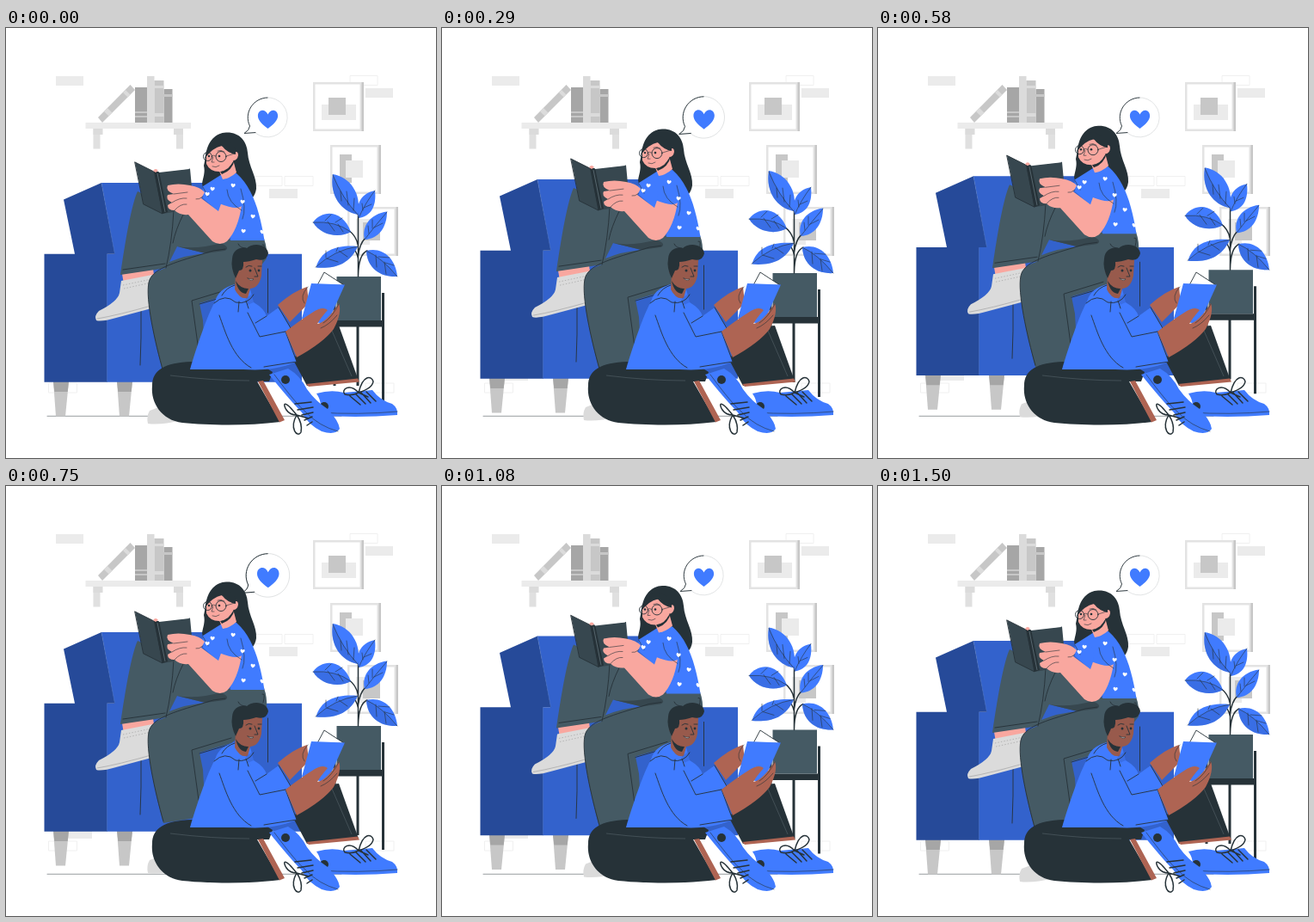
An HTML page for the animation above (1.54 s loop, 500 by 500 pixels).

```html
<!DOCTYPE html>
<html lang="en">
<head>
<meta charset="utf-8">
<title>Reading together</title>
<style>
  html, body { margin: 0; width: 100%; height: 100%; overflow: hidden; background: #fff; }
  svg { display: block; width: 100vw; height: 100vh; }
  .blue { fill: #407bff; } .mid { fill: #3362cc; } .deep { fill: #264a99; }
  .ink { fill: #263238; } .slate { fill: #455a64; } .shade { fill: #37474f; }
  .pale { fill: #ebebeb; } .soft { fill: #dbdbdb; } .grey { fill: #c7c7c7; } .dim { fill: #a6a6a6; }
  .rose { fill: #f9a79f; } .tan { fill: #ae6453; } .brown { fill: #985a4c; } .white { fill: #fff; }
  .line { fill: none; stroke: #263238; stroke-width: .9; stroke-linecap: round; stroke-linejoin: round; }
  .fine { stroke-width: .6; } .bold { stroke-width: 1.5; }
  .seam { fill: none; stroke: #56646b; stroke-width: .6; }
  .stitch { fill: none; stroke: #aaa; stroke-width: .8; }
  .brick { fill: #fff; stroke: #ededed; stroke-width: .8; }
</style>
</head>
<body>
<svg viewBox="0 0 500 500">
  <defs>
    <path id="heart" d="M0,11.5 C-6,7 -12,2 -11.6,-4 C-11,-11 -3,-12 0,-5 C3,-12 11,-11 11.6,-4 C12,2 6,7 0,11.5Z"/>
    <g id="frame">
      <rect class="grey" width="59" height="57"/>
      <rect fill="#e3e3e3" width="56.5" height="57"/>
      <rect class="white" x="2.5" y="2.5" width="52" height="52"/>
    </g>
    <g id="foot">
      <path class="grey" d="M-9,411H9L5,451.500H-6Z"/>
      <path class="dim" d="M-9,411H9L7.700,423H-7.700Z"/>
    </g>
  </defs>

  <!-- wall -->
  <path class="pale" d="M58,56h32v11h-32Z M418,70h32v11h-32Z M306,187h33v11h-33Z M68,400h32v10h-32Z"/>
  <path class="brick" d="M400,55.500h32v11h-32Z M289,172.500h32v11h-32Z M324,172.500h33v11h-33Z M49.500,413h33v11h-33Z M418,413h33v11h-33Z"/>
  <path fill="#e0e0e0" d="M101.500,117h8v23.500h-8Z M198,117h8v23.500h-8Z"/>
  <path class="soft" d="M101.500,117h11v7h-11Z M195,117h11v7h-11Z"/>
  <rect class="pale" x="92.500" y="110" width="122.500" height="7"/>
  <path class="grey" d="M107,104L144.500,66L150,72L112,110Z"/>
  <path class="soft" d="M114,97l4,-4 5.500,5.500 -4,4Z M136,75l3,-3 5.500,5.500 -3,3Z"/>
  <path class="dim" d="M150,69h14v41h-14Z M183.500,71h10v39h-10Z"/>
  <path class="soft" d="M164,56h8.500v54h-8.500Z"/>
  <path class="grey" d="M172.500,61h11v49h-11Z M150,97h14v2h-14Z M150,102h14v2h-14Z M183.500,77h10v3h-10Z"/>
  <path class="soft" d="M172.500,67h11v3h-11Z M172.500,99h11v4h-11Z"/>
  <use href="#frame" x="357" y="63"/>
  <path class="pale" d="M367,89h40v18h-40Z"/><path class="grey" d="M375,81h20v20h-20Z"/>
  <use href="#frame" x="377" y="136"/>
  <path class="grey" d="M388,147h14v33h-14Z"/><path class="pale" d="M395,154h20v20h-20Z"/>
  <use href="#frame" x="397" y="208"/>
  <path class="pale" d="M407,222h16v30h-16Z"/><path class="grey" d="M415,226h20v21h-20Z"/>
  <path class="line fine" d="M48,451.300H390" opacity=".8"/>

  <g id="bubble">
    <path fill="#fff" stroke="#b5babd" stroke-width=".4" d="M290,122L277,122.500Q283,119 283.500,114A23,23 0 1 1 290,122Z"/>
    <path class="line" d="M290,121.500L277,122.500Q283,119 283.500,114A23,23 0 0 1 304,81"/>
    <use href="#heart" class="blue" x="304.500" y="105.500"/>
  </g>

  <!-- sofa -->
  <g class="float">
    <use href="#foot" x="64"/><use href="#foot" x="138"/>
    <path class="mid" d="M111,180H240L275,263H126Z M117,262.700H344V411.700H117Z"/>
    <path class="deep" d="M67,199.500L111,180L126.500,262.700H80Z M44.500,262.700H117.500V411.700H44.500Z"/>
    <path fill="none" stroke="#5078c8" stroke-width=".5" d="M111,180L126.500,262.500 M117.500,263V411"/>
    <path class="line" d="M157,326V360L156,392 M304.500,280V331"/>
  </g>

  <!-- plant -->
  <g class="float">
    <path class="ink" d="M380.500,308h3v108h-3Z M407.500,346h3v70h-3Z M437,308h3v125h-3Z M382,340h57v7.500h-57Z"/>
    <path class="slate" d="M384.500,289H436V340H384.500Z"/>
    <path class="line bold" d="M409.500,289V205 M409.500,265Q411,251 418,244 M409.500,253Q407,241 398,235 M409.500,288Q410,263 420,259 M409.500,268Q407,256 401,257"/>
    <g class="blue">
      <path d="M409,217C390,213 376,196 380,170C400,173 414,193 409,217Z"/>
      <path d="M410,221C406,203 414,192 429,189C431,206 425,219 410,221Z"/>
      <path d="M401,237C387,245 366,241 357,226C368,211 391,211 401,237Z"/>
      <path d="M417,246C413,230 424,216 443,213.500C443,231 434,245 417,246Z"/>
      <path d="M409,254C388,252 366,257 360.500,278.500C381,280 399,276 409,254Z"/>
      <path d="M419,259C437,254 453,267 455,289C436,290 420,280 419,259Z"/>
    </g>
    <path class="mid" opacity=".5" d="M409,217C390,213 376,196 380,170Q391,198 409,217Z M401,237C387,245 366,241 357,226Q383,224 401,237Z
      M409,254Q382,258 360.500,278.500C381,280 399,276 409,254Z M455,289C436,290 420,280 419,259Q437,267 455,289Z"/>
    <path class="line fine" d="M380,171Q391,198 409,217 M389,190L390,201 M396,190L398,206 M405,198L404,212
      M429,189Q418,203 410,221 M414,204L415,212 M425,205L416,209
      M357,226Q383,224 401,237 M371,224L378,217 M383,226L391,221 M374,225L382,236 M386,228L392,237
      M443,214Q429,230 417,246 M426,223V233 M438,227L428,232 M421,230L422,239
      M360,278Q382,258 409,254 M372,267L372,259 M384,260L386,255 M373,268L386,272 M387,259L397,266
      M419,259Q437,267 455,289 M433,266L446,267 M441,273L451,276 M430,264L431,278 M440,272L442,286"/>
  </g>

  <!-- girl -->
  <g class="float">
    <path class="soft" d="M167,445L188,437L204,456Q180,462 165,460Q163,452 167,445Z"/>
    <path class="ink" d="M232,150C234,131 244,122 256,121.500C272,121 280,132 281,145C282,161 292,173 291,187Q290,194 286,198Q283,186 273,178L238,188Q229,190 228,181C229,174 232,168 230,160Z"/>
    <path class="rose" d="M135,286L171,280L173,294L137,298Z"/>
    <path class="soft" d="M134,294L170,287Q174,305 173,325L128,337Q111,342 105,340Q102,335 108,329Q130,318 132,308Z"/>
    <path class="stitch" stroke-dasharray="1.500 2" d="M136,299L169,292 M137,303L169,296"/>
    <path class="stitch" d="M106,338Q130,334 172,322"/>
    <path class="slate" d="M153,190L176,200L205,205L246,246L300,245Q304,256 303,268L285,291L262,309L225,320L229,340L232,394L183,402C173,365 162,315 166,296Q168,284 187,279L133,287C139,246 146,205 153,190Z"/>
    <path class="mid" d="M190,272L199,254L232,262Q209,264 190,272Z"/>
    <path class="shade" d="M199,254Q222,258 250,250Q262,256 254,259L232,262Z"/>
    <path class="line" d="M195,212Q193,250 186,279 M136,281L185,274 M183,400C173,365 162,315 166,296C169,280 195,273 228,263Q240,258 255,257
      M262,303L216,317L224,375 M225,321L262,310 M194,250Q197,235 206,217 M298,252Q302,250 299,262"/>
    <path class="blue" d="M229,184L256,167L268,169Q278,178 284,190C292,205 297,225 300.500,247H261L262,222L245,212L228,197Z"/>
    <path class="rose" d="M247,164L264,153L268,168Q260,175 252,176Z"/>
    <path class="ink" d="M249,167Q259,163 266,153Q263,166 251,170Z"/>
    <path class="rose" d="M233,146Q236,138 247,136Q259,139 263,146Q270,141 270,148Q269,154 264,154Q260,166 248,167Q237,167 233,158Z"/>
    <path class="ink" d="M231,152Q235,131 250,129Q268,133 267,147Q257,145 251,137Q240,139 231,152Z"/>
    <path class="line fine" d="M241,150l-2,6 3,0 M240,161Q244,163 248,160 M233,144l4,-1 M246,143Q250,141 254,144 M256,149L266,146 M239,149Q241,147 244,149"/>
    <circle class="line" cx="234.500" cy="149.500" r="5"/><circle class="line" cx="250" cy="149.500" r="6"/>
    <circle class="ink" cx="236" cy="149" r="1.200"/><circle class="ink" cx="248" cy="149" r="1.300"/>
    <path class="shade" d="M150,156L173,167.500L214,163.500L216,185L195,214L182,216L160,205Z"/>
    <path class="ink" d="M172,167L178,167L188,214L182,216Z"/>
    <path class="line" d="M150,156L173,167.500L182,216L160,205Z"/>
    <path d="M176,169L185,214" fill="none" stroke="#6b7c85" stroke-width=".7"/>
    <path class="white" d="M177,166L212,162.500L213,164L178,168Z"/>
    <path class="rose" d="M171,166Q174,162 177,166L174,168Z"/>
    <path class="rose" d="M253,196L274,206Q270,234 257,248Q249,254 240,248L212,217Q202,218 196,212Q188,212 188,206L193,203Q185,199 188,194L195,193Q185,189 188,183Q200,180 214,183Q226,185 231,191L227,198L247,213Z"/>
    <path class="line fine" d="M195,193L211,191 M193,203Q202,197 210,198 M196,212Q203,204 210,205 M229,196Q224,200 221,199"/>
    <path class="blue" d="M246,182Q254,171 268,178L275,206Q270,213 248,204Q255,200 246,182Z"/>
    <path class="line fine" d="M229,185L235,196 M257,188Q258,203 274,212 M273,187Q280,210 275,222"/>
    <g id="hearts" class="white"></g>
  </g>

  <!-- boy -->
  <path class="ink" d="M334,386L356,349L387,346L410,410L350,416Z"/>
  <path class="tan" d="M349,414L409,407.500L411,411.500L352,417Z"/>
  <path class="seam" d="M379,352L402,405"/>
  <path class="blue" d="M361,425Q378,420 393,424L426,421Q435,433 449,437Q456,442 455,450Q405,454 360,450Q371,440 361,425Z"/>
  <path class="line fine" d="M362,447Q410,450 455,446"/>
  <circle class="ink" cx="370" cy="440" r="5"/>
  <path class="line bold" d="M400,428L412,438 M407,426L418,437 M413,424L424,436 M419,423L430,434 M410,424C399,412 389,421 394,426Q402,428 410,424C415,403 425,404 427,411Q426,419 410,424L421,429"/>
  <path class="ink" d="M170,416C170,398 184,389 216,388L296,391L310,400L306,411L292,411L319,458C280,463 235,462 205,459C181,456 168,436 170,416Z"/>
  <path class="tan" d="M293,411L299,410L324,456L318,458.500Z"/>
  <path class="seam" d="M191,404Q240,410 283,410"/>
  <path class="blue" d="M306,403L328,396Q342,404 350,420Q360,434 374,443Q387,457 388,466Q383,474 367,469Q351,461 344,447Q331,434 306,403Z"/>
  <path class="line fine" d="M312,403Q337,437 349,447Q364,463 386,469"/>
  <circle class="ink" cx="325" cy="409" r="5"/>
  <path class="line bold" d="M336,437L355,435 M339,444L357,441 M344,450L357,447 M347,456L356,452 M350,462L356,458 M338,450C322,430 322,438 326,444Q330,450 338,450C329,466 339,477 343,470Q345,460 338,450L352,454"/>
  <path class="tan" d="M316,322Q334,306 350,301L352,320L330,342Z"/>
  <path class="blue" d="M214,397C222,370 234,334 243,318Q247,303 266,298L284,304L288,319Q300,326 303,335L317,325L331,349L325,353L338,388C315,398 294,398 276,397Z"/>
  <path class="brown" d="M267,284L286,296L281,314Q272,316 266,304Z"/>
  <path class="ink" d="M267,294Q272,303 282,303L279,309Q270,308 267,294Z"/>
  <path class="mid" opacity=".5" d="M279,314L287,309L288,319L281,322Z"/>
  <path class="line" d="M248,334C255,353 263,383 285,395 M325,353L295,359L281,331 M325,353L338,388L300,394 M303,335L290,343 M317,325L331,349 M242,320Q255,308 267,319Q281,322 288,310 M266,299Q256,302 251,311 M271,318L270,330 M279,317L282,326"/>
  <path class="brown" d="M268,270Q282,260 298,270L297,288Q294,303 283,303Q272,302 268,289Q262,284 265,279Z"/>
  <path class="ink" d="M267,291Q261,279 263,268C264,257 273,254 280,256C287,249 304,251 305,262Q303,272 291,269Q282,272 276,272Q277,282 271,282Z"/>
  <path class="line" d="M270,251Q272,256 279,256 M289,279l4,10 -4,0 M279,278Q282,275 286,277 M293,277l4,0"/>
  <circle class="ink" cx="284" cy="282" r="1.500"/><circle class="ink" cx="294" cy="282" r="1.400"/>
  <path class="line fine" style="fill:#fff" d="M281,291Q285,293 288,292Q285,295 281,291Z"/>
  <path class="line" style="fill:#fff" d="M362,299L370,284L393,299Z"/>
  <path class="blue" d="M355,297L394,298.500L373,345L344,338Z"/>
  <path class="line fine" d="M351,301Q341,312 347,320"/>
  <path class="tan" d="M325,353Q343,339 356,331Q368,323 374,328Q366,337 362,344Q373,342 387,320Q391,331 381,350Q369,366 338,383Z"/>
  <path class="line fine" d="M387,321Q379,337 369,343 M385,334Q376,345 366,349"/>
</svg>
<script>
  const LOOP = 1540, CYCLE = 1500, STEP = CYCLE / 36;
  const floats = document.querySelectorAll('.float');
  const bubble = document.getElementById('bubble');
  const spots = [[264, 183], [275, 202], [287, 219], [276, 236], [298, 237], [240, 187], [234, 193]];
  const lift = [[0, 0], [.5, -10], [1, 0]];
  const beat = [[0, 1], [.1, 1.1], [.3, 1], [.4, 1], [.5, 1.1], [.6, 1], [1, 1]];

  document.getElementById('hearts').innerHTML = spots.map(([x, y]) =>
    `<use href="#heart" transform="translate(${x} ${y}) rotate(8) scale(.22)"/>`).join('');

  function sample(keys, p) {
    const i = Math.max(1, keys.findIndex(k => k[0] >= p));
    const [a, from] = keys[i - 1], [b, to] = keys[i];
    return from + (to - from) * (p - a) / (b - a);
  }

  function draw(now) {
    // 24 poses a second, with the resting pose held at the end
    const p = Math.min(36, Math.floor((now % LOOP + 4) / STEP)) / 36;
    const y = sample(lift, p), s = sample(beat, p);
    floats.forEach(g => g.setAttribute('transform', `translate(0 ${y})`));
    bubble.setAttribute('transform', `translate(302 104) scale(${s}) translate(-302 -104)`);
  }

  const start = performance.now();
  function tick() {
    draw(performance.now() - start);
    requestAnimationFrame(tick);
  }
  draw(0);
  requestAnimationFrame(tick);
</script>
</body>
</html>
```
